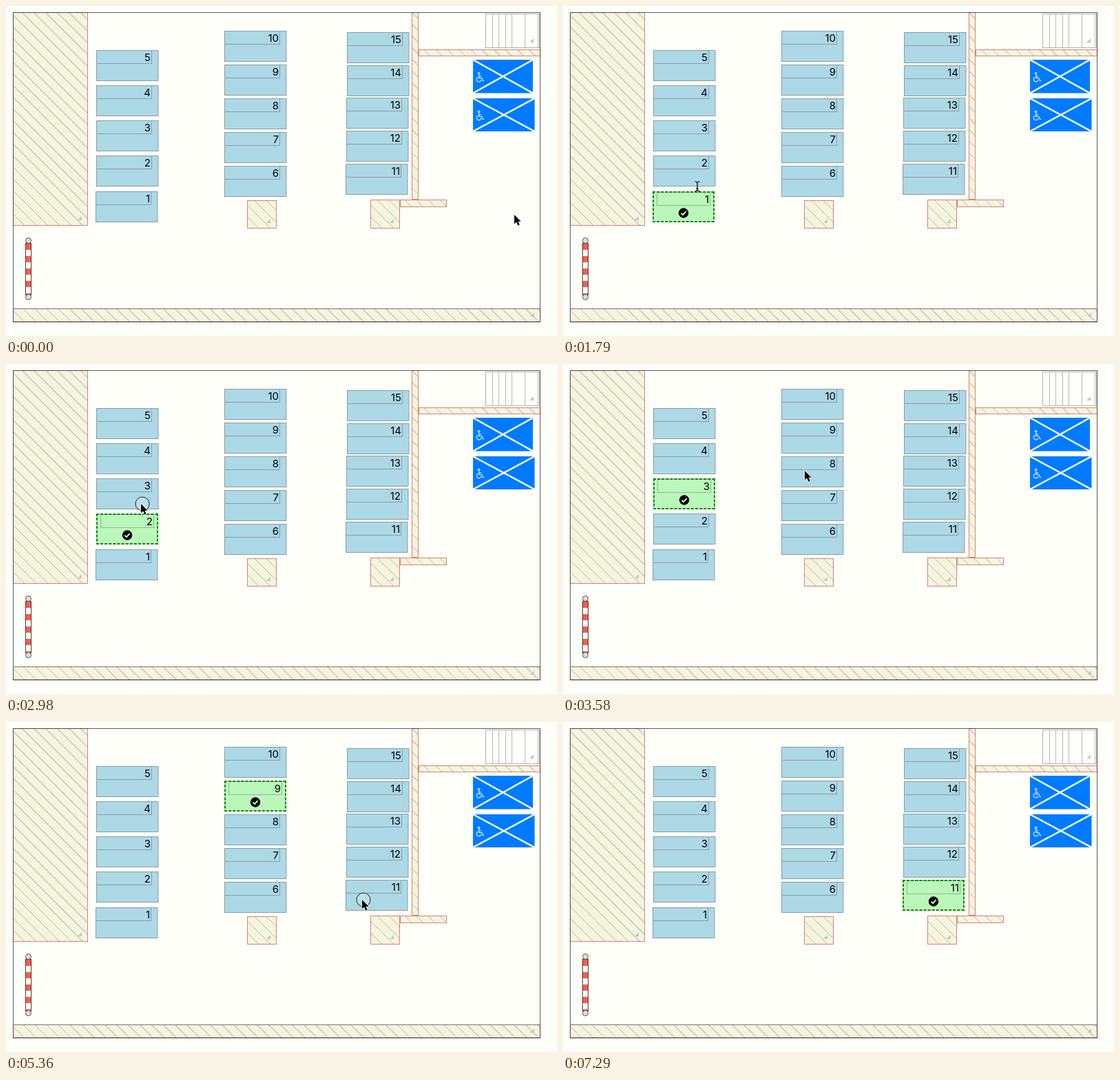
Animation of 800 by 479 pixels, one loop 7890 ms. Source, as an HTML page:

```html
<!DOCTYPE html>
<html lang="en">
<head>
<meta charset="utf-8">
<title>Parking plan</title>
<style>
  html, body { margin: 0; width: 100%; height: 100%; overflow: hidden; background: #fefff8; }
  div, #plan { position: absolute; box-sizing: border-box; }
  #plan { left: 0; top: 0; }
  .wall {
    border: 1px solid #dc7f78;
    background: repeating-linear-gradient(45deg, #f5f5dc 0 10px, #d2d3d3 10px 12px);
  }
  .stairs {
    border: 1px solid #b4b4b4;
    background: repeating-linear-gradient(90deg, #fefffa 0 8.5px, #b8b8b8 8.5px 9.5px);
  }
  .bar {
    border: 1px solid #4a3a38;
    background: repeating-linear-gradient(#f75c4c 0 9px, #fff 9px 18px);
  }
  .grip::after {
    content: ""; position: absolute; right: 8px; bottom: 7px; width: 6px; height: 6px;
    background: #c6c7c2; clip-path: polygon(100% 0, 100% 100%, 0 100%);
  }
  text { font: 15px Inter, "Liberation Sans", sans-serif; text-anchor: end; fill: #000; }
  .spot rect { fill: #add8e6; stroke: #8a9ea6; }
  .spot .label { fill: none; }
  .spot .on, .spot.picked .off { display: none; }
  .spot.picked .on { display: inline; }
  .spot .on .body { fill: #bbf6bb; stroke: none; }
  .spot .on .label { stroke: #93b893; }
  .dashes { stroke: #0b860b; stroke-width: 2; stroke-dasharray: 4 2.100; }
</style>
</head>
<body>
<svg id="plan" width="800" height="479" viewBox="0 0 800 479">
  <g id="spots"></g>
  <g id="reserved"></g>
  <g fill="#dcdcdc" stroke="#555">
    <circle cx="32.5" cy="340.5" r="4"/>
    <circle cx="32.5" cy="422.5" r="4"/>
  </g>
  <rect x="10.5" y="9.5" width="765" height="449" fill="none" stroke="#3c3232" stroke-opacity=".8"/>
  <path d="M10 439.500H775" stroke="#85706b"/>
  <path d="M10 458.500H775" stroke="#4a1616"/>
  <g id="pointer">
    <circle id="ring" cx="2" cy="0" r="10" fill="#fff" fill-opacity=".2" stroke="#222"/>
    <path id="arrow" transform="scale(.92)" d="M0 0V14.500L3.400 11.500L5.800 17L8.400 15.900L6 10.600H10.500Z"
      stroke="#fff" stroke-width="1.600" paint-order="stroke" stroke-linejoin="round"/>
    <path id="beam" d="M-3.500 -7Q0 -7 0 -4Q0 -7 3.500 -7M0 -4V5M-3.500 7Q0 7 0 4Q0 7 3.500 7M-2 3H2"
      fill="none" stroke="#000" stroke-width="1.200"/>
  </g>
</svg>
<script>
  const $ = id => document.getElementById(id);

  function box(kind, x, y, w, h) {
    const el = document.createElement("div");
    el.className = kind;
    el.style.cssText = `left:${x}px;top:${y}px;width:${w}px;height:${h}px`;
    document.body.insertBefore(el, $("plan"));
  }
  box("wall grip", 10, 9, 109, 310);
  box("wall grip", 350, 282, 43, 41);
  box("wall grip", 529, 281, 43, 42);
  box("wall", 589, 9, 10, 272);
  box("wall", 599, 63, 177, 10);
  box("wall", 572, 281, 68, 11);
  box("wall grip", 10, 439, 766, 20);
  box("stairs grip", 696, 11, 79, 50);
  box("bar", 28, 344, 9, 76);

  const rect = (kind, x, y, w, h) =>
    `<rect class="${kind}" x="${x}" y="${y}" width="${w}" height="${h}"/>`;

  const spot = (n, x, y) => `
    <g class="spot" transform="translate(${x} ${y})">
      <g class="off">${rect("body", .5, .5, 89.5, 44)}${rect("label", .5, .5, 80, 19)}
        <text x="79" y="16">${n}</text></g>
      <g class="on">${rect("body", 0, 0, 90, 45)}${rect("label", 6.5, 1.5, 77, 19)}
        <path class="dashes" d="M0 1H90M0 44H90M1 0V45M89 0V45"/>
        <text x="82" y="17">${n}</text>
        <circle cx="45" cy="31.500" r="7.200"/>
        <path d="M41.500 31.700L44 34.200L48.600 29.200" fill="none" stroke="#e4ffe4" stroke-width="1.800"/></g>
    </g>`;

  // Three columns of five, numbered upwards and leaning slightly right
  const column = (first, x, y, pitch, lean) => Array.from({ length: 5 }, (_, i) =>
    spot(first + i, Math.ceil(x + lean * i), Math.floor(y - pitch * i))).join("");
  $("spots").innerHTML = column(1, 130, 269, 51.2, .2)
    + column(6, 317, 232, 49, 0) + column(11, 493, 229, 47.6, .45);
  const spots = [...document.querySelectorAll(".spot")];

  const bay = (x, y, w, h) => `
    <g transform="translate(${x} ${y})">
      <rect width="${w}" height="${h}" fill="#007bff"/>
      <path d="M0 0L${w} ${h}M0 ${h}L${w} 0" stroke="#fff" stroke-width="2.400"/>
      <g fill="none" stroke="#fff" stroke-width="1.100" transform="translate(.8 ${h / 2 - 21.5}) scale(.92)">
        <circle cx="8.500" cy="18.500" r="1.400"/>
        <path d="M8.700 20.500V26H13L15 30.500L16.500 30M8.700 23H12.500M7 24.500A3.800 3.800 0 1 0 12.300 29"/>
      </g>
    </g>`;
  $("reserved").innerHTML = bay(678, 78, 87, 48.5) + bay(678, 134, 89.5, 48);

  const LOOP = 7890, START = 600, LAST = 45, STEP = 6690 / LAST;
  const HOME = [738, 303];
  // Each move: leaves at step, arrives at step, x, y, spot clicked there
  const moves = [
    [-1, 5, 195, 300, 1],
    [7, 9, 195, 249, 2],
    [12, 15, 196, 203, 3],
    [17, 20, 351, 155],
    [20, 22, 367, 119, 9],
    [25, 31, 517, 258, 11],
    [34, 38, 583, 350],
    [38, 44, 772, 466]
  ];
  const clicks = moves.filter(m => m[4]).map(([, arrive, , , n]) => ({ at: arrive + 1, n }));

  const easeOut = u => u * (2 - u);
  const clamp = (v, lo, hi) => Math.max(lo, Math.min(hi, v));

  const pointAt = step => moves.reduce(([px, py], [from, to, x, y]) => {
    const u = easeOut(clamp((step - from) / (to - from), 0, 1));
    return [px + (x - px) * u, py + (y - py) * u];
  }, HOME);

  const show = (id, on) => $(id).setAttribute("display", on ? "inline" : "none");

  function draw(now) {
    const step = clamp(Math.floor((now % LOOP - START) / STEP + 1e-6), -1, LAST);
    const picked = clicks.reduce((last, { at, n }) => step > at ? n : last, 0);
    const overText = step === 8;
    spots.forEach((el, i) => el.classList.toggle("picked", i + 1 === picked));
    show("pointer", step < LAST);
    show("ring", clicks.some(c => c.at === step));
    show("beam", overText);
    show("arrow", !overText);
    $("pointer").setAttribute("transform", `translate(${pointAt(step)})`);
  }
  function tick() {
    draw(performance.now());
    requestAnimationFrame(tick);
  }
  tick();
</script>
</body>
</html>
```
